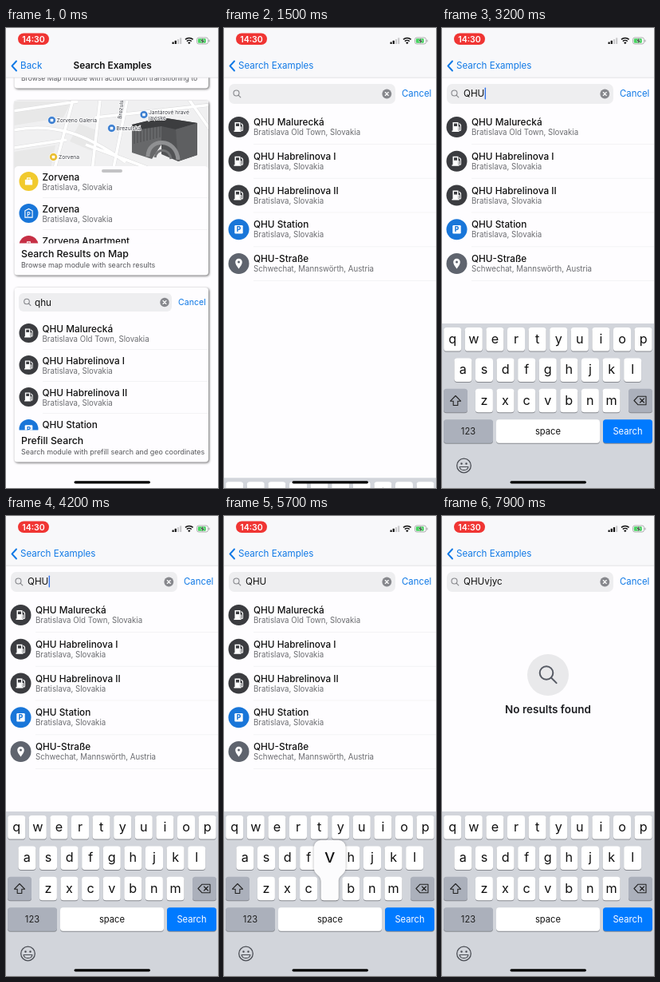
These frames come from a looping animation (266 by 576 pixels, 8000 ms). An HTML page:

```html
<!DOCTYPE html>
<html lang="en">
<head>
<meta charset="utf-8">
<title>Search prefill</title>
<style>
  html, body { margin: 0; width: 100%; height: 100%; overflow: hidden; background: #fff; }
  svg { display: block; width: 266px; height: 576px; font-family: Inter, "Open Sans", sans-serif; }
  text { white-space: pre; }
  .card { filter: drop-shadow(1.5px 1.5px 1.8px #0009); }
  .key { filter: drop-shadow(0 1px 0 #878a90); }
  .bubble { filter: drop-shadow(0 0 1.5px #0005); }
  #page { filter: drop-shadow(-1px 0 3px #0002); }
</style>
</head>
<body>
<svg id="stage" viewBox="0 0 266 576"></svg>
<script>
const LOOP = 8000, W = 266;
const BLUE = '#007aff', LINK = '#1079e6', DARK = '#3b3c40', SIGN = '#1976d9', GREY = '#6b6c70';
const PAPER = '#fefdff', RULE = '#efeff1';
const BRAND = 'QHU', CITY = 'Bratislava, Slovakia';

const PLACES = [
  ['fuel', DARK, `${BRAND} Malurecká`, 'Bratislava Old Town, Slovakia'],
  ['fuel', DARK, `${BRAND} Habrelinova I`, CITY],
  ['fuel', DARK, `${BRAND} Habrelinova II`, CITY],
  ['park', SIGN, `${BRAND} Station`, CITY],
  ['pin', '#5f646e', `${BRAND}-Straße`, 'Schwechat, Mannswörth, Austria']
];
const LATE_PLACE = ['fuel', DARK, `${BRAND} Pod lišou`, CITY];

const MALL = [
  ['bag', '#f1ca2e', 'Zorvena', CITY],
  ['garage', SIGN, 'Zorvena', CITY],
  ['bag', '#c62f45', 'Zorvena Apartment', CITY]
];

// char, press, release
const STROKES = [['v', 5650, 5800], ['j', 6100, 6250], ['y', 6400, 6600], ['c', 6900, 7050]];
// x, y, press, release
const TOUCHES = [[126.5, 422, 760, 900], [153, 157.5, 4480, 4800]];

// ---------- drawing helpers ----------
const text = (x, y, s, size, extra = '') =>
  `<text x="${x}" y="${y}" font-size="${size}" ${extra}>${s}</text>`;
const rect = (x, y, w, h, fill, r = 0, extra = '') =>
  `<rect x="${x}" y="${y}" width="${w}" height="${h}" rx="${r}" fill="${fill}" ${extra}/>`;
const line = (d, color, width, extra = '') =>
  `<path d="${d}" fill="none" stroke="${color}" stroke-width="${width}" ${extra}/>`;
const group = (id, body, extra = '') => `<g id="${id}" ${extra}>${body}</g>`;
const clip = (id, x, y, w, h) => `<clipPath id="${id}">${rect(x, y, w, h, '#000')}</clipPath>`;
const ROUND = 'stroke-linecap="round" stroke-linejoin="round"';
const MIDDLE = 'text-anchor="middle"';

const GLYPHS = {
  fuel: () => '<path fill="#fff" fill-rule="evenodd" d="M-5-6h7v10.500h1v1.500h-9v-1.500h1zM-3.500-4.500v3.500h4v-3.500z"/>' +
    line('M2 0h1v3.500a1 1 0 0 0 2 0v-6l-2-2', '#fff', 1.1),
  park: color => rect(-5.2, -5.2, 10.4, 10.4, '#fff', 1.3) +
    text(0, 3, 'P', 8.4, `${MIDDLE} font-weight="800" fill="${color}"`),
  pin: color => `<path fill="#fff" d="M0 6.500C-3 2.500-4.300.5-4.300-2a4.300 4.300 0 0 1 8.600 0C4.300.5 3 2.500 0 6.500z"/><circle cy="-2" r="1.500" fill="${color}"/>`,
  bag: () => rect(-5, -2.5, 10, 7.5, '#fff', 1) + line('M-2-2.500v-2h4v2', '#fff', 1.2),
  garage: () => line('M-5 5.500v-9l5-2.500 5 2.500v9z', '#fff', 1.2) +
    text(0, 3.8, 'P', 7.5, `${MIDDLE} font-weight="700" fill="#fff"`)
};
const icon = (kind, color, x, y, r) =>
  `<g transform="translate(${x} ${y}) scale(${r / 13})"><circle r="13" fill="${color}"/>${GLYPHS[kind](color)}</g>`;

const place = ([kind, color, name, where], ix, iy, r, tx, ty, gap) =>
  icon(kind, color, ix, iy, r) +
  text(tx, ty, name, 11.8, 'font-weight="500" fill="#111"') +
  text(tx, ty + gap, where, 9.7, `fill="${GREY}"`);

const lens = (x, y, r, color, width) =>
  `<circle cx="${x}" cy="${y}" r="${r}" fill="none" stroke="${color}" stroke-width="${width}"/>` +
  line(`M${x + r * .72} ${y + r * .72}l${r * .8} ${r * .8}`, color, width, ROUND);
const clearButton = (x, y, r) =>
  `<circle cx="${x}" cy="${y}" r="${r}" fill="#87888d"/>` +
  line(`M${x - 2} ${y - 2}l4 4m0-4l-4 4`, '#fff', 1.1, ROUND);

// ---------- first screen ----------
const card = (y, h) => rect(10.5, y, 243.5, h, PAPER, 4, 'class="card"');
const caption = (y, title, sub) =>
  text(19, y, title, 12.3, 'font-weight="500" fill="#111"') + text(19, y + 13, sub, 8.95, 'fill="#55565a"');
const cardRow = (p, y) => place(p, 28.5, y + 1, 12, 45.5, y, 11.5);
const poi = (x, y, color) =>
  `<circle cx="${x}" cy="${y}" r="5" fill="${color}" stroke="#fff" stroke-width=".8"/>` + rect(x - 1.8, y - 1.8, 3.6, 3.6, '#fff', .6);

function cityMap() {
  const roads = 'M8 104L90 92M8 128C60 118 100 132 150 168M84 90L60 180M10 150L76 140M118 90L108 180M152 90L134 180M112 112L258 96M100 146L180 176M230 90L258 130';
  const label = (x, y, s) => text(x, y, s, 6.7, 'fill="#3a3c44" stroke="#fff" stroke-width="1.600" paint-order="stroke"');
  const ribs = Array.from({ length: 9 }, (_, i) => `M${161 + i * 4} ${121 - i}v24`).join('');
  return rect(10, 91, 245, 90, '#f0f0f1') +
    '<path d="M10 92h72l-10 20-62 10zM92 120l22 8-6 26-28-12zM10 155l52-8-6 30h-46z" fill="#e8e8e8"/>' +
    line(roads, '#dcdcdd', 4.6) + line(roads, '#fff', 3.6) +
    '<path d="M158 121l37-9v34l-12 18-25-8z" fill="#67686a"/>' + line(ribs, '#505153', 1.2) +
    '<path d="M195 112l45 7v40l-24 8-21-9z" fill="#525355"/>' +
    '<path d="M158 121l37-9 45 7-27 8-18-4-34 5z" fill="#3c3d3f"/>' +
    '<path d="M213 127l27-8v40l-24 8z" fill="#5e5f61"/>' +
    line('M178 161c0-24 36-24 38 4', '#8f9092', 5) + line('M187 162c2-12 18-12 20 2', '#737476', 3) +
    poi(57.5, 115.5, '#3b7ed0') + label(63.5, 118, 'Zorveno Galeria') +
    poi(132.5, 125.5, '#3b7ed0') + label(138.5, 128, 'Brezulská') +
    `<g transform="translate(145 114) rotate(-84)">${label(0, 0, 'Brezulská')}</g>` +
    poi(173, 108.5, '#3b7ed0') + label(179, 107.5, 'Jantárové hravé') + label(179, 114.5, 'javisko') +
    poi(59.5, 161.5, '#e9bd2c') + label(66, 164, 'Zorvena');
}

const home = group('home',
  rect(0, 0, W, 576, PAPER) +
  card(40, 35.5) +
  text(19, 66, 'Browse Map module with action button transitioning to', 8.6, 'fill="#55565a"') +

  card(91, 218.5) +
  `<g clip-path="url(#mapBox)">${cityMap()}</g>` +
  `<g clip-path="url(#mallBox)">` + rect(10.5, 173, 243.5, 100, PAPER, 5) + rect(120, 177, 26, 4, '#c3c3c5', 2) +
  MALL.map((p, i) => cardRow(p, 191 + i * 40)).join('') +
  line('M46 212.500h208M46 252.500h208', RULE, .7) + '</g>' +
  caption(286.5, 'Search Results on Map', 'Browse map module with search results') +

  card(325, 218.5) +
  rect(16, 332, 192, 23, '#eeeef0', 6) + lens(26, 342.5, 3.3, '#85868b', 1.1) +
  text(36, 347.5, BRAND.toLowerCase(), 11.7, 'fill="#111"') + clearButton(199, 343.5, 5.7) +
  text(216, 347.3, 'Cancel', 10.6, `fill="${LINK}"`) +
  '<g clip-path="url(#prefillBox)">' + PLACES.slice(0, 4).map((p, i) => cardRow(p, 381 + i * 40)).join('') +
  line('M46 402.500h208M46 442.500h208M46 482.500h208', RULE, .7) + '</g>' +
  rect(10.5, 503.5, 243.5, 40, '#a4a4a6', 0, 'id="pressed"') +
  caption(521, 'Prefill Search', 'Search module with prefill search and geo coordinates') +
  rect(0, 0, 400, 576, '#000', 0, 'id="shade"'));

// ---------- second screen ----------
const PITCH = 42.75;
const resultRow = (p, i, id) => group(id, place(p, 18.5, 124 + i * PITCH, 13, 37, 122 + i * PITCH, 12.2) +
  line(`M37 ${145.5 + i * PITCH}H266`, RULE, .7));
const spokes = Array.from({ length: 12 }, (_, i) =>
  `<path d="M0-3.500v-3" transform="rotate(${i * 30})" stroke="#77787d" stroke-width="1" stroke-linecap="round" opacity="${.2 + i * .055}"/>`).join('');

const page = group('page',
  rect(0, 60, W, 516, PAPER) +
  rect(6, 70, 209, 25, '#eeeef0', 7) +
  group('glass', lens(15.5, 81.5, 3.5, '#85868b', 1.1)) + group('spinner', spokes) +
  text(27, 86.3, '', 11.7, 'id="query" fill="#111"') + rect(0, 74.5, 1.4, 15, '#3474e8', .7, 'id="caret"') +
  clearButton(204.3, 82.5, 5.9) + text(223, 86.3, 'Cancel', 11.4, `fill="${LINK}"`) +
  group('results',
    rect(0, 145.5, W, 42.7, '#dfdfe1', 0, 'id="picked"') +
    PLACES.map((p, i) => resultRow(p, i, 'row' + i)).join('') + resultRow(LATE_PLACE, 3, 'late')) +
  group('nothing', '<circle cx="133" cy="199" r="26" fill="#e9e9eb"/>' +
    lens(131, 196.5, 8.3, '#565a64', 2) +
    text(133, 247, 'No results found', 13.5, `${MIDDLE} font-weight="600" fill="#1d1e22"`)));

// ---------- bars and keyboard ----------
const bars = rect(0, 0, W, 62, '#f8f8fa') + line('M0 62.200H266', '#d2d2d5', .6) +
  rect(15, 6.5, 39, 14.5, '#f03533', 7.25) +
  text(34.5, 17.6, '14:30', 10.6, `${MIDDLE} font-weight="600" fill="#fff"`) +
  [0, 1, 2, 3].map(i => rect(208.5 + i * 3.2, 17.4 - i * 1.7, 2.2, 2.6 + i * 1.7, i < 2 ? '#111' : '#c9c9cb', .6, `id="bar${i}"`)).join('') +
  line('M225 14.400a7 7 0 0 1 9.600 0M226.900 16.600a4.200 4.200 0 0 1 5.800 0', '#111', 1.5) +
  '<path d="M229.800 20.300l-1.700-2a2.400 2.400 0 0 1 3.400 0z" fill="#111"/>' +
  rect(239.5, 12, 14, 8, 'none', 2.4, 'stroke="#9c9c9e" stroke-width=".8"') + rect(254.5, 14.6, 1, 2.8, '#9c9c9e', .5) +
  rect(240.8, 13.3, 10, 5.4, '#45d35f', 1.2) + '<path d="M247.600 11.500l-3.500 5h2.200l-.9 4 3.600-5h-2.300z" fill="#111" stroke="#f8f8f9" stroke-width=".5"/>' +
  line('M13 41.500l-5.500 6 5.500 6', LINK, 1.9, ROUND) +
  text(18, 51.3, 'Back', 11.7, `id="back" fill="${LINK}"`) +
  text(0, 51.3, 'Search Examples', 11.8, 'id="title" font-weight="600" fill="#111"') +
  text(0, 51.3, 'Search Examples', 11.6, `id="backTo" fill="${LINK}"`);

const KEYS = {};
['qwertyuiop', 'asdfghjkl', 'zxcvbnm'].forEach((row, r) =>
  [...row].forEach((ch, i) => KEYS[ch] = [[13.2, 26.4, 52.9][r] + i * 26.6, 375 + r * 38.4]));

const keyCap = (x, y, w, fill) => rect(x, y, w, 29.5, fill, 3.6, 'class="key"');
const keyboard = group('keyboard',
  rect(0, 370, W, 206, '#d2d5db') +
  Object.entries(KEYS).map(([ch, [x, y]]) =>
    keyCap(x - 11, y, 22, '#fff') + text(x, y + 20, ch, 16.2, `${MIDDLE} fill="#111"`)).join('') +
  keyCap(2, 451.8, 30, '#abb0bb') + keyCap(234, 451.8, 30, '#abb0bb') +
  line('M17 460.500l-6.500 6.700h3.700v5.300h5.600v-5.300h3.700z', '#222', 1.1, ROUND) +
  line('M241 466.500l5-5.300h10v10.600h-10zM248.500 464l5 5m0-5l-5 5', '#222', 1.1, ROUND) +
  keyCap(2, 490.2, 62, '#abb0bb') + keyCap(68, 490.2, 130, '#fff') + keyCap(202, 490.2, 62, BLUE) +
  text(33, 509, '123', 11.2, `${MIDDLE} fill="#222"`) + text(133, 509, 'space', 11.2, `${MIDDLE} fill="#111"`) +
  text(233, 509, 'Search', 11.2, `${MIDDLE} fill="#fff"`) +
  '<circle cx="27.500" cy="548" r="8.800" fill="none" stroke="#4b4e55" stroke-width="1.300"/><circle cx="24.500" cy="545.500" r="1.200" fill="#4b4e55"/><circle cx="30.500" cy="545.500" r="1.200" fill="#4b4e55"/>' +
  line('M22 549.500h11c-1 5.500-10 5.500-11 0z', '#4b4e55', 1.1, ROUND));

const stage = document.getElementById('stage');
stage.innerHTML = '<defs>' + clip('mapBox', 10.5, 91, 243.5, 85) + clip('mallBox', 10.5, 173, 243.5, 96.5) +
  clip('prefillBox', 10.5, 360, 243.5, 143.5) + '</defs>' + home + page + bars + keyboard +
  group('popup', '<path id="bulb" class="bubble" fill="#fcfcfd"/>' + text(0, 0, '', 24, `id="popChar" ${MIDDLE} fill="#111"`)) +
  rect(85.5, 567.2, 95.5, 3.3, '#000', 1.65) +
  '<circle id="touch" fill="#4aa3e6" stroke="#2a8fdc" stroke-width="1.500"/>';

// ---------- motion ----------
const $ = {};
stage.querySelectorAll('[id]').forEach(el => $[el.id] = el);
const set = (el, attrs) => { for (const k in attrs) el.setAttribute(k, attrs[k]); };
const show = (el, alpha) => { el.style.opacity = +alpha; };
const ramp = (t, a, b) => Math.min(1, Math.max(0, (t - a) / (b - a)));
const mix = (a, b, p) => a + (b - a) * p;
const spring = (t, start) => {
  const x = Math.max(0, t - start) * .016;
  return x > 9 ? 1 : 1 - (1 + x) * Math.exp(-x);
};

function bulbPath(x, top) {
  return `M${x - 11} ${top + 72}V${top + 52}C${x - 11} ${top + 43} ${x - 20} ${top + 44} ${x - 20} ${top + 34}V${top + 9}` +
    `a9 9 0 0 1 9-9h22a9 9 0 0 1 9 9V${top + 34}C${x + 20} ${top + 44} ${x + 11} ${top + 43} ${x + 11} ${top + 52}V${top + 72}` +
    'a3.500 3.500 0 0 1-3.500 3.500h-15a3.500 3.500 0 0 1-3.500-3.500z';
}

function drawTouch(t) {
  const hit = TOUCHES.find(([, , down, up]) => t >= down && t < up + 450);
  show($.touch, !!hit);
  if (!hit) return;
  const [x, y, down, up] = hit, out = ramp(t, up, up + 200);
  set($.touch, { cx: x, cy: y, r: 14 + 6 * ramp(t, down, down + 100) + 9.5 * out, 'fill-opacity': .55 * (1 - out) });
  show($.touch, Math.min(ramp(t, down - 20, down + 80), 1 - ramp(t, up + 200, up + 450)));
}

function drawField(t) {
  const done = STROKES.filter(s => t >= s[2]);
  const hidden = t >= 1400 && t < 1600;
  $.query.textContent = hidden ? '' : BRAND + done.map(s => s[0]).join('');
  const since = done.length ? done[done.length - 1][2] : 1800;
  const phase = (t - since) % 1000;
  $.caret.setAttribute('x', 27.3 + $.query.getComputedTextLength());
  show($.caret, t < 1800 ? 0 : 1 - ramp(phase, 600, 700));
  const busy = t >= 5800 && t < 7500;
  show($.glass, !busy);
  show($.spinner, busy);
  set($.spinner, { transform: `translate(16 82.5) rotate(${Math.floor(t / 83.33) * 30})` });
}

function drawPopup(t) {
  const hit = STROKES.find(s => t >= s[1] && t < s[2]);
  show($.popup, !!hit);
  if (!hit) return;
  const [x, y] = KEYS[hit[0]], top = y - 46;
  set($.bulb, { d: bulbPath(x, top) });
  set($.popChar, { x, y: top + 28.5 });
  $.popChar.textContent = hit[0];
}

function render(t) {
  const p = spring(t, 900);
  set($.home, { transform: `translate(${-.3 * W * p} 0)` });
  set($.page, { transform: `translate(${W * (1 - p)} 0)` });
  show($.page, p > 0);
  show($.shade, .04 * p);
  show($.pressed, t >= 800);

  set($.title, { x: mix(84.5, 18, p) });
  set($.backTo, { x: mix(96, 18, p) });
  set($.back, { x: mix(18, -32, p) });
  show($.title, 1 - ramp(p, 0, .5));
  show($.backTo, ramp(p, .2, .7));
  show($.back, 1 - ramp(p, 0, .4));

  set($.keyboard, { transform: `translate(0 ${206 * (1 - spring(t, 1476))})` });
  show($.picked, Math.min(t >= 4600, 1 - ramp(t, 4950, 5250)));
  show($.row3, t < 6250);
  show($.late, t >= 6250);
  show($.row4, t < 7000);
  show($.results, t < 7400);
  show($.nothing, t >= 7400);
  $.bar2.setAttribute('fill', t >= 7000 ? '#111' : '#c9c9cb');

  drawField(t);
  drawPopup(t);
  drawTouch(t);
}

const start = performance.now();
function tick() {
  render((performance.now() - start) % LOOP);
  requestAnimationFrame(tick);
}
tick();
</script>
</body>
</html>
```
